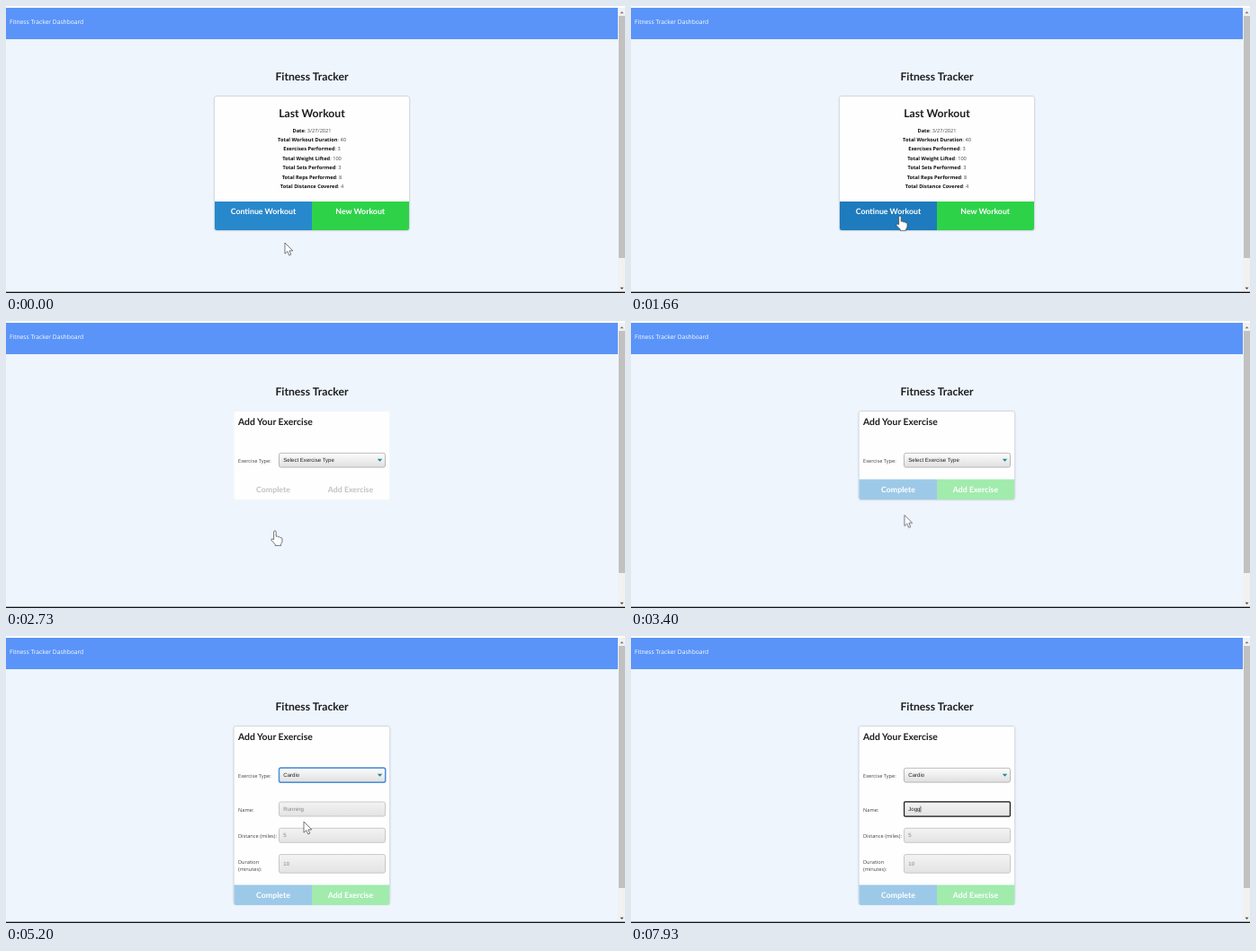
Recreate the animation shown at these times as an HTML page. Size 688x320 px, loop 8000 ms.

```html
<!DOCTYPE html>
<html lang="en">
<head>
<meta charset="utf-8">
<title>Fitness Tracker</title>
<style>
html, body { margin: 0; width: 100%; height: 100%; overflow: hidden; background: #eef5fd; }
svg { display: block; width: 100%; height: 100%; }
text { font: 5.65px "Open Sans", "Noto Sans", sans-serif; fill: #444; text-rendering: geometricPrecision; white-space: pre; }
.mid { text-anchor: middle; }
.title, .heading, .action { font-family: Lato, "Open Sans", sans-serif; font-weight: 700; fill: #1c1d1e; }
.title { font-size: 12.2px; }
.heading { font-size: 10.4px; }
.action { font-size: 8.77px; fill: #fff; text-anchor: middle; }
.brand { font-size: 6.68px; fill: #fff; }
.field { font: 6.07px "Liberation Sans", Arial, sans-serif; fill: #222; }
.hint { fill: #858585; }
.stats tspan { font-weight: 700; fill: #111; }
.card { fill: #fefefe; filter: drop-shadow(0 .5px 1px rgba(34,36,38,.38)); }
.input { fill: url(#inputFill); stroke: #bdbdbd; stroke-width: .8; }

/* 1% = 80 ms */
svg * { animation: 8s step-end infinite; }
.summary { animation-name: summary; }
.form { animation-name: form; }
.extra { animation-name: extra; }
.before { animation-name: before; }
.plate { animation-name: plate; }
.actions { animation-name: actions; }
.tint { animation-name: tint; animation-timing-function: linear; }
.fade { animation-name: fade; animation-timing-function: linear; }
.hover { animation-name: hover; animation-timing-function: linear; }
.menu { animation-name: menu; }
.pick { animation-name: pick; }
.opt1 { animation-name: opt1; }
.opt2 { animation-name: opt2; }
.opt3 { animation-name: opt3; }
.ring { animation-name: ring; }
.outline { animation-name: outline; }
.pointer { animation-name: move; animation-timing-function: ease-in-out; }
.arrow { animation-name: arrow; }
.hand { animation-name: hand; }
.beam { animation-name: beam; }
.empty { animation-name: empty; }
.t1 { animation-name: t1; }
.t2 { animation-name: t2; }
.t3 { animation-name: t3; }
.t4 { animation-name: t4; }
.caret { animation-name: caret; }

@keyframes summary { 0% { display: inline; opacity: 1 } 32.5%, 100% { opacity: 0 } }
@keyframes form { 0% { opacity: 0 } 32.5%, 100% { opacity: 1 } }
@keyframes extra { 0% { opacity: 0 } 64.8%, 100% { opacity: 1 } }
@keyframes before { 0% { opacity: 1 } 64.8%, 100% { opacity: 0 } }
@keyframes plate {
  0% { height: 98px; filter: none }
  34.8% { height: 98px; filter: drop-shadow(0 .5px 1px rgba(34,36,38,.38)) }
  64.8%, 100% { height: 198px; filter: drop-shadow(0 .5px 1px rgba(34,36,38,.38)) }
}
@keyframes actions { 0% { transform: none } 64.8%, 100% { transform: translateY(101px) } }
@keyframes tint { 0%, 34.3% { opacity: 0 } 35.5%, 100% { opacity: 1 } }
@keyframes fade { 0%, 34.3% { fill: #c2c2c2 } 35.5%, 100% { fill: #fff } }
@keyframes hover { 0%, 8.6% { fill: #2888cc } 9.9%, 25% { fill: #1e7bbd } 26.2%, 100% { fill: #1670b0 } }
@keyframes menu { 0% { opacity: 0 } 55% { opacity: 1 } 64.8%, 100% { opacity: 0 } }
@keyframes pick { 0% { transform: none } 59% { transform: translateY(7.5px) } 61.5%, 100% { transform: translateY(15px) } }
@keyframes opt1 { 0% { fill: #fff } 59%, 100% { fill: #222 } }
@keyframes opt2 { 0% { fill: #222 } 59% { fill: #fff } 61.5%, 100% { fill: #222 } }
@keyframes opt3 { 0% { fill: #222 } 61.5%, 100% { fill: #fff } }
@keyframes ring { 0% { opacity: 0 } 54.5% { opacity: 1 } 81%, 100% { opacity: 0 } }
@keyframes outline { 0% { opacity: 0 } 81%, 100% { opacity: 1 } }
@keyframes move {
  0%, 2% { transform: translate(310px, 264px) }
  9.8%, 13% { transform: translate(303.5px, 246px) }
  21%, 38% { transform: translate(299px, 234px) }
  43% { transform: translate(304px, 216px) }
  50.5%, 55.5% { transform: translate(324px, 153px) }
  63.8% { transform: translate(330px, 184px) }
  64.8%, 69% { transform: translate(331px, 207px) }
  77%, 100% { transform: translate(333px, 192px) }
}
@keyframes arrow { 0% { opacity: 1 } 8.4% { opacity: 0 } 39% { opacity: 1 } 73%, 100% { opacity: 0 } }
@keyframes hand { 0% { opacity: 0 } 8.4% { opacity: 1 } 39%, 100% { opacity: 0 } }
@keyframes beam { 0% { opacity: 0 } 73% { opacity: 1 } 92%, 100% { opacity: 0 } }
@keyframes empty { 0% { opacity: 1 } 92%, 100% { opacity: 0 } }
@keyframes t1 { 0% { fill-opacity: 0 } 92%, 100% { fill-opacity: 1 } }
@keyframes t2 { 0% { fill-opacity: 0 } 94.2%, 100% { fill-opacity: 1 } }
@keyframes t3 { 0% { fill-opacity: 0 } 96.5%, 100% { fill-opacity: 1 } }
@keyframes t4 { 0% { fill-opacity: 0 } 98.3%, 100% { fill-opacity: 1 } }
@keyframes caret {
  0% { opacity: 0; transform: none }
  81% { opacity: 1; transform: none }
  87.5% { opacity: 0; transform: none }
  92% { opacity: 1; transform: translateX(3px) }
  94.2% { opacity: 1; transform: translateX(6.4px) }
  96.5% { opacity: 1; transform: translateX(9.8px) }
  98.3%, 100% { opacity: 1; transform: translateX(13.4px) }
}
</style>
</head>
<body>
<svg viewBox="0 0 688 320">
  <defs>
    <linearGradient id="selectFill" x2="0" y2="1"><stop stop-color="#fcfcfc"/><stop offset="1" stop-color="#dfdfdf"/></linearGradient>
    <linearGradient id="inputFill" x2="0" y2="1"><stop stop-color="#f3f3f3"/><stop offset="1" stop-color="#e3e3e3"/></linearGradient>
  </defs>

  <rect width="688" height="320" fill="#eef5fd"/>
  <rect width="688" height="2" fill="#fdfdfe"/>
  <rect y="2" width="680" height="35" fill="#5a94f9"/>
  <text class="brand" x="4" y="20.2">Fitness Tracker Dashboard</text>
  <text class="title mid" x="340" y="83.2">Fitness Tracker</text>

  <rect x="680" y="2" width="8" height="317" fill="#f1f1f1"/>
  <rect x="681" y="11" width="7" height="270" fill="#c1c1c1"/>
  <path d="M682.5 8.3l2-2.3 2 2.3z" fill="#777"/>
  <path d="M682.5 313.8l2 2.3 2-2.3z" fill="#444"/>
  <rect y="318.7" width="688" height="1.3" fill="#111"/>

  <g class="summary">
    <rect class="card" x="232" y="101" width="216" height="149" rx="2"/>
    <text class="title mid" x="340" y="124.3">Last Workout</text>
    <g class="stats mid">
      <text x="340" y="140.5"><tspan>Date</tspan>: 3/27/2021</text>
      <text x="340" y="150.9"><tspan>Total Workout Duration</tspan>: 40</text>
      <text x="340" y="161.3"><tspan>Exercises Performed</tspan>: 3</text>
      <text x="340" y="171.7"><tspan>Total Weight Lifted</tspan>: 100</text>
      <text x="340" y="182.1"><tspan>Total Sets Performed</tspan>: 3</text>
      <text x="340" y="192.5"><tspan>Total Reps Performed</tspan>: 8</text>
      <text x="340" y="202.9"><tspan>Total Distance Covered</tspan>: 4</text>
    </g>
    <path class="hover" d="M232 218h108v32h-106q-2 0-2-2z"/>
    <path d="M340 218h108v30q0 2-2 2h-106z" fill="#2ed249"/>
    <text class="action" x="286" y="232.1">Continue Workout</text>
    <text class="action" x="393.7" y="232.1">New Workout</text>
  </g>

  <g class="form">
    <rect class="card plate" x="253.5" y="101" width="172.7" height="98" rx="2"/>
    <text class="heading" x="258" y="116.4">Add Your Exercise</text>
    <text x="258" y="157.7">Exercise Type:</text>
    <rect x="303.5" y="147.3" width="118" height="15.8" rx="2" fill="url(#selectFill)" stroke="#a9a9a9" stroke-width=".8"/>
    <rect class="ring" x="303.5" y="147" width="118.2" height="16.3" rx="2" fill="none" stroke="#4a90dc" stroke-width="1.5"/>
    <text class="field before" x="308.3" y="157.2">Select Exercise Type</text>
    <text class="field extra" x="308.3" y="157.2">Cardio</text>
    <path d="M412.8 153.7h5.4l-2.7 3z" fill="#128c9c"/>

    <g class="extra">
      <text x="258" y="195.6">Name:</text>
      <text x="258" y="224.6">Distance (miles):</text>
      <text x="258" y="253.9">Duration</text>
      <text x="258" y="262.1">(minutes):</text>
      <rect class="input" x="303.5" y="185" width="118" height="16" rx="2"/>
      <rect class="input" x="303.5" y="214.3" width="118" height="16" rx="2"/>
      <rect class="input" x="303.5" y="243.6" width="118" height="20.6" rx="2"/>
      <rect class="outline" x="303.6" y="184.9" width="117.8" height="16.2" rx="1" fill="none" stroke="#1b1b1b" stroke-width="1.2"/>
      <text class="field hint empty" x="308.3" y="195.1">Running</text>
      <text class="field" x="308.3" y="195.1"><tspan class="t1">J</tspan><tspan class="t2">o</tspan><tspan class="t3">g</tspan><tspan class="t4">g</tspan></text>
      <rect class="caret" x="308.4" y="189.7" width=".6" height="6.8" fill="#111"/>
      <text class="field hint" x="308.3" y="224.4">5</text>
      <text class="field hint" x="308.3" y="256">10</text>
    </g>

    <g class="actions">
      <path class="tint" d="M253.5 176.5h86.5v22.5h-84.5q-2 0-2-2z" fill="#9dc9e8"/>
      <path class="tint" d="M340 176.5h86.2v20.5q0 2-2 2h-84.2z" fill="#a1ebad"/>
      <text class="action fade" x="297" y="190.6">Complete</text>
      <text class="action fade" x="383" y="190.6">Add Exercise</text>
    </g>

    <g class="menu">
      <rect x="303.5" y="163.4" width="118" height="23.3" fill="#fff" stroke="#8a8a8a" stroke-width=".5"/>
      <rect class="pick" x="303.8" y="163.8" width="117.4" height="7.5" fill="#1a73d8"/>
      <text class="field opt1" x="307" y="169.7">Select Exercise Type</text>
      <text class="field opt2" x="307" y="177.2">Resistance</text>
      <text class="field opt3" x="307" y="184.7">Cardio</text>
    </g>
  </g>

  <g class="pointer" fill="#fff" stroke="#3c3f45" stroke-width=".7" stroke-linejoin="round">
    <path class="arrow" d="M0 0V12.2L2.8 9.6L4.8 14L6.8 13.1L4.9 8.9H8.8Z"/>
    <path class="hand" d="M-1.4 9.6V1.2a1.3 1.3 0 0 1 2.6 0V6.2q2-.6 2.4 .6q2-.4 2.3 .7q2-.2 2.1 1.3V11.5q0 2-1.4 3.2V16.4H.2V15L-4 10.6q-.6-1.8 1-1.6Z"/>
    <path class="beam" d="M-1.5-3.5H1.5M0-3.5V3.5M-1.5 3.5H1.5" fill="none"/>
  </g>
</svg>
</body>
</html>
```
